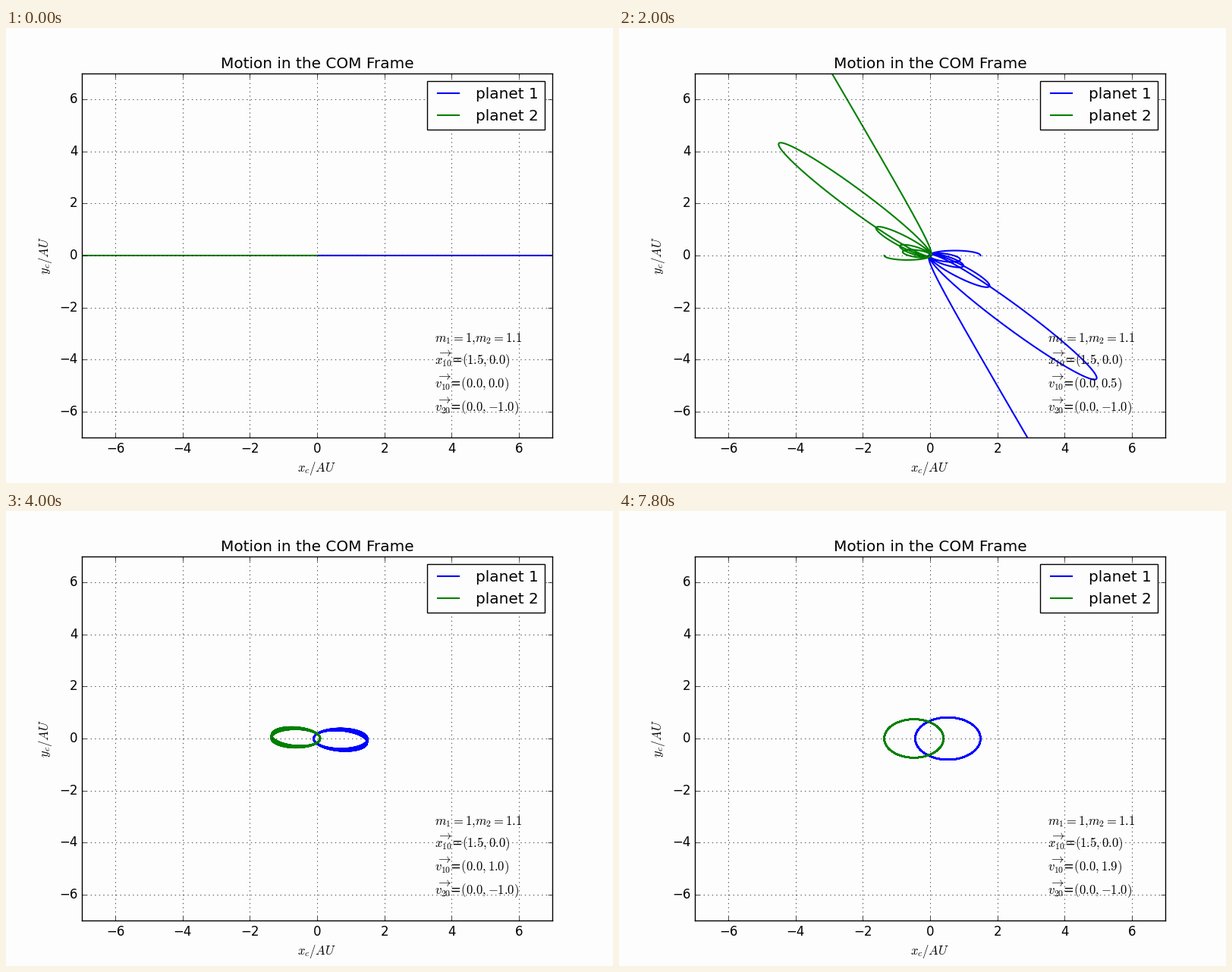
Write a matplotlib script that moves like this. It is 800x600 px and loops after 8000 ms.

```python
import numpy as np
import matplotlib.pyplot as plt
from matplotlib.animation import FuncAnimation

plt.style.use("classic")
BG = "#fdfdfd"
plt.rcParams.update({
    "font.family": "DejaVu Sans",
    "figure.facecolor": BG,
    "axes.facecolor": BG,
    "savefig.facecolor": BG,
    "savefig.dpi": "figure",
})

M1, M2 = 1.0, 1.1
X0 = 1.5                                   # start of planet 1, AU
G = 4 * np.pi ** 2                         # AU^3 / (yr^2 solar mass)
MU = G * M2 ** 3 / (M1 + M2) ** 2          # pull on planet 1 towards the COM
DT, STEPS = 0.001, 50000
FRAMES, INTERVAL = 40, 200
SPEEDS = [round(0.05 * k, 2) for k in range(FRAMES - 1)]


def orbits(speeds):
    """Euler-Cromer paths of planet 1, one column per starting speed."""
    vel = 1j * np.array(speeds)
    pos = np.full(len(speeds), X0, dtype=complex)
    path = np.empty((STEPS + 1, len(speeds)), dtype=complex)
    path[0] = pos
    for i in range(1, STEPS + 1):
        vel = vel - (MU * DT) * pos / np.abs(pos) ** 3
        pos = pos + vel * DT
        path[i] = pos
    return path


paths = orbits(SPEEDS)

fig = plt.figure(figsize=(8, 6), dpi=100)
ax = fig.add_subplot(111)
line1, = ax.plot([], [], "b-", lw=1.5, label="planet 1")
line2, = ax.plot([], [], "g-", lw=1.5, label="planet 2")
ax.set_xlim(-7, 7)
ax.set_ylim(-7, 7)
ax.set_xticks(range(-6, 7, 2))
ax.set_yticks(range(-6, 7, 2))
ax.grid(True)
ax.set_title("Motion in the COM Frame")
ax.set_xlabel("$x_c/AU$")
ax.set_ylabel("$y_c/AU$")
ax.legend(loc="upper right")


def vector(name, x, y):
    return r"$\overrightarrow{%s}$=$(%s,%s)$" % (name, x, y)


def note(row, text):
    return ax.text(3.5, -3.3 - 0.9 * row, text)


note(0, "$m_1=1{,}m_2=1.1$")
note(1, vector("x_{10}", X0, 0.0))
speed_note = note(2, "")
note(3, vector("v_{20}", 0.0, "{-}1.0"))


def draw(i):
    k = i if i <= 20 else i - 1            # speed 1.0 is shown twice
    z = paths[:, k]
    line1.set_data(z.real, z.imag)
    line2.set_data(-z.real * M1 / M2, -z.imag * M1 / M2)
    speed_note.set_text(vector("v_{10}", 0.0, SPEEDS[k]))
    return line1, line2, speed_note


anim = FuncAnimation(fig, draw, frames=FRAMES, interval=INTERVAL,
                     init_func=lambda: draw(0), repeat=True, blit=False)
plt.show()
```
